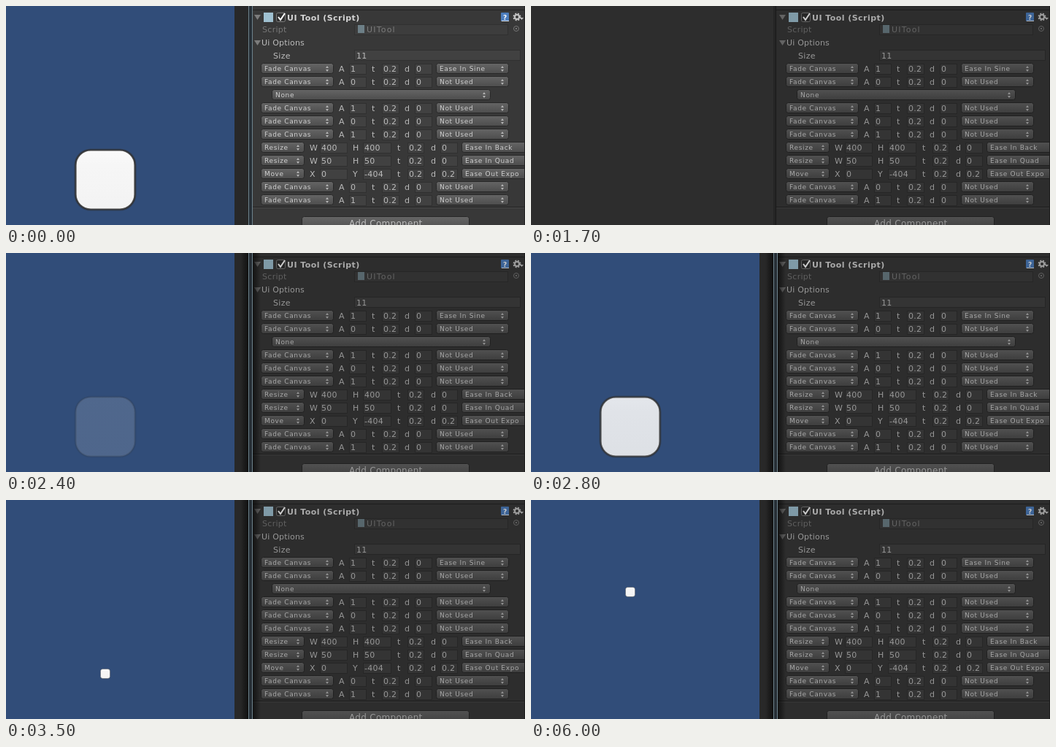
Animation, 711 px wide and 300 px high, one loop 6.1 s. Source, as an HTML page with a canvas:

```html
<!DOCTYPE html>
<html lang="en">
<head>
<meta charset="utf-8">
<title>UI Tool</title>
<style>
html, body { margin: 0; width: 100%; height: 100%; overflow: hidden; background: #2b2b2b; }
canvas { display: block; }
</style>
</head>
<body>
<canvas id="stage" width="711" height="300"></canvas>
<script>
const ctx = document.getElementById('stage').getContext('2d');
const LOOP = 6100, STEP = 100;
const FONT = '"DejaVu Sans", Verdana, sans-serif';

function rect(x, y, w, h, color) {
  ctx.fillStyle = color;
  ctx.fillRect(x, y, w, h);
}

function round(x, y, w, h, r, fill, stroke) {
  ctx.beginPath();
  ctx.roundRect(x, y, w, h, r);
  if (fill) { ctx.fillStyle = fill; ctx.fill(); }
  if (stroke) { ctx.strokeStyle = stroke; ctx.stroke(); }
}

function text(str, x, y, { size = 11, color = '#bcbcbc', gap = 0.3, weight = '' } = {}) {
  ctx.font = `${weight} ${size}px ${FONT}`;
  ctx.letterSpacing = gap + 'px';
  ctx.fillStyle = color;
  ctx.fillText(str, x, y);
}

function poly(color, ...points) {
  ctx.fillStyle = color;
  ctx.beginPath();
  points.forEach(([x, y]) => ctx.lineTo(x, y));
  ctx.fill();
}

function foldout(y) {
  poly('#7c7c7c', [340, y - 3], [349, y - 3], [344.5, y + 4]);
}

function buttonShape(x, y, w, h) {
  const shade = ctx.createLinearGradient(0, y, 0, y + h);
  shade.addColorStop(0, '#666');
  shade.addColorStop(1, '#4c4c4c');
  round(x + 0.5, y + 0.5, w - 1, h - 1, 3, shade, '#282828');
}

function dropdown(label, x, w, y) {
  buttonShape(x - 1, y - 8, w + 2, 15);
  text(label, x + 4, y + 3, { size: 9, gap: 0.65, color: '#d0d0d0' });
  const ax = x + w - 8;
  poly('#b4b4b4', [ax - 2, y - 1], [ax + 2, y - 1], [ax, y - 4]);
  poly('#b4b4b4', [ax - 2, y + 1], [ax + 2, y + 1], [ax, y + 4]);
}

function field(x, y, w, h = 15, fill = '#414141') {
  rect(x, y, w, h, '#303030');
  rect(x + 1, y + 1, w - 2, h - 2, fill);
}

function input(label, labelX, value, x, w, y) {
  text(label, labelX, y + 4);
  field(x, y - 7, w);
  text(value, x + 2, y + 4);
}

function fadeRow(y, alpha, ease = 'Not Used') {
  dropdown('Fade Canvas', 350, 98, y);
  input('A', 456, alpha, 470, 24, y);
  input('t', 501, '0.2', 515, 24, y);
  input('d', 546, '0', 560, 24, y);
  dropdown(ease, 590, 98, y);
}

function pairRow(y, kind, [nameA, a], [nameB, b], delay, ease) {
  dropdown(kind, 350, 58, y);
  input(nameA, 416, a, 430, 38, y);
  input(nameB, 475, b, 489, 39, y);
  input('t', 536, '0.2', 550, 23, y);
  input('d', 582, delay, 595, 24, y);
  dropdown(ease, 625, 98, y);
}

function header() {
  rect(336, 5, 374, 1, '#242424');
  foldout(15);
  rect(353, 9, 13, 13, '#9fc0d0');
  round(370.5, 9.5, 12, 12, 2, '#303030', '#7c7c7c');
  ctx.strokeStyle = '#fff';
  ctx.lineWidth = 2;
  ctx.beginPath();
  ctx.moveTo(373, 15);
  ctx.lineTo(376, 19);
  ctx.lineTo(382, 10);
  ctx.stroke();
  ctx.lineWidth = 1;
  text('UI Tool (Script)', 385, 20, { weight: 'bold', gap: 0.45, color: '#d6d6d6' });

  round(678, 9, 11, 12, 1, '#4c7dbd');
  rect(679, 20, 10, 1, '#dfe6ee');
  text('?', 681, 19, { size: 9, weight: 'bold', color: '#fff' });
  ctx.strokeStyle = '#c4c4c4';
  ctx.lineWidth = 2;
  ctx.setLineDash([2, 1.6]);
  ctx.beginPath();
  ctx.arc(700, 15, 4.5, 0, 7);
  ctx.stroke();
  ctx.setLineDash([]);
  ctx.beginPath();
  ctx.arc(700, 15, 3, 0, 7);
  ctx.stroke();
  ctx.lineWidth = 1;
  poly('#c4c4c4', [704, 16], [709, 16], [706.5, 19]);
}

function panel() {
  rect(336, 0, 375, 300, '#383838');
  header();

  text('Script', 351, 36, { color: '#777' });
  field(477, 25, 211, 15, '#3d3d3d');
  rect(482, 26, 9, 11, '#6d7f87');
  text('UITool', 494, 36, { gap: 1.2, color: '#7c7c7c' });
  ctx.strokeStyle = '#777';
  ctx.beginPath();
  ctx.arc(699, 31, 3.5, 0, 7);
  ctx.stroke();
  rect(698, 30, 2, 2, '#777');

  foldout(50);
  text('Ui Options', 350, 54, { gap: 0.2 });
  text('Size', 366, 72);
  field(477, 60, 228);
  text('11', 480, 72);

  fadeRow(86, '1', 'Ease In Sine');
  fadeRow(104, '0');
  dropdown('None', 365, 298, 122);
  ['1', '0', '1'].forEach((a, i) => fadeRow(140 + 18 * i, a));
  pairRow(194, 'Resize', ['W', '400'], ['H', '400'], '0', 'Ease In Back');
  pairRow(212, 'Resize', ['W', '50'], ['H', '50'], '0', 'Ease In Quad');
  pairRow(230, 'Move', ['X', '0'], ['Y', '-404'], '0.2', 'Ease Out Expo');
  fadeRow(248, '0');
  fadeRow(266, '1');

  rect(336, 275, 374, 1, '#222');
  rect(336, 276, 374, 1, '#4a4a4a');
  buttonShape(405, 288, 230, 20);
  text('Add Component', 470, 302, { size: 12 });
  rect(710, 0, 1, 300, '#222');
}

// Darkness fading away from the window edge, to either side.
function edgeShadow(from, to) {
  const shade = ctx.createLinearGradient(from, 0, to, 0);
  shade.addColorStop(0, 'rgba(0,0,0,.6)');
  shade.addColorStop(1, 'rgba(0,0,0,0)');
  rect(Math.min(from, to), 0, Math.abs(to - from), 300, shade);
}

function windowEdge(reach) {
  rect(0, 0, 313, 300, '#314d79');
  rect(313, 0, 19, 300, '#282828');
  if (reach) {
    edgeShadow(332, 332 - reach);
    edgeShadow(338, 338 + reach);
  }
  rect(332, 0, 6, 300, '#272f36');
  rect(332, 0, 1, 300, '#6d828c');
  rect(337, 0, 1, 300, '#6d828c');
}

function box({ size, y, alpha }) {
  if (!alpha) return;
  ctx.save();
  ctx.globalAlpha = alpha;
  ctx.translate(136, y);
  ctx.scale(size / 84, size / 84);
  ctx.lineWidth = 3;
  round(-41, -41, 82, 82, 21, null, 'rgba(45,45,45,.45)');
  const shade = ctx.createLinearGradient(0, -40, 0, 40);
  shade.addColorStop(0, '#fafafa');
  shade.addColorStop(0.25, '#f6f6f6');
  shade.addColorStop(1, '#f3f3f3');
  ctx.lineWidth = 2.2;
  round(-40.5, -40.5, 81, 81, 20.5, shade, 'rgba(50,50,50,.85)');
  ctx.restore();
}

const clamp = v => Math.min(1, Math.max(0, v));
const mix = (a, b, p) => a + (b - a) * p;
const inSine = p => 1 - Math.cos(p * Math.PI / 2);
const inBack = p => p * p * (2.7 * p - 1.7);
const outExpo = p => p < 1 ? 1 - 2 ** (-10 * p) : 1;

function pose(t) {
  const full = { size: 84, y: 238, alpha: 1 };
  if (t < 1700) return full;
  if (t < 2300) return { ...full, alpha: 0 };
  if (t < 3000) return { ...full, alpha: inSine(clamp((t - 2150) / 700)) };
  const grow = inBack(clamp((t - 2900) / 300));
  const shrink = clamp((t - 3200) / 300) ** 2;
  const rise = outExpo(clamp((t - 3600) / 600));
  return {
    size: mix(mix(84, 101, grow), 13.5, shrink),
    y: mix(238, 126, rise),
    alpha: 1
  };
}

function draw(t) {
  panel();
  if (t >= 900) rect(336, 0, 375, 300, 'rgba(0,0,0,.2)');
  if (t < 1700 || t >= 1900) {
    windowEdge(t < 900 ? 0 : t < 1700 ? 4 : 11);
    box(pose(t));
  } else {
    rect(0, 0, 336, 300, '#2d2d2d');
    rect(332, 0, 4, 300, '#252525');
    rect(335, 0, 1, 300, '#191919');
  }
}

const start = performance.now();
function tick() {
  const t = (performance.now() - start) % LOOP;
  draw(Math.floor(t / STEP) * STEP);
  requestAnimationFrame(tick);
}
tick();
</script>
</body>
</html>
```
